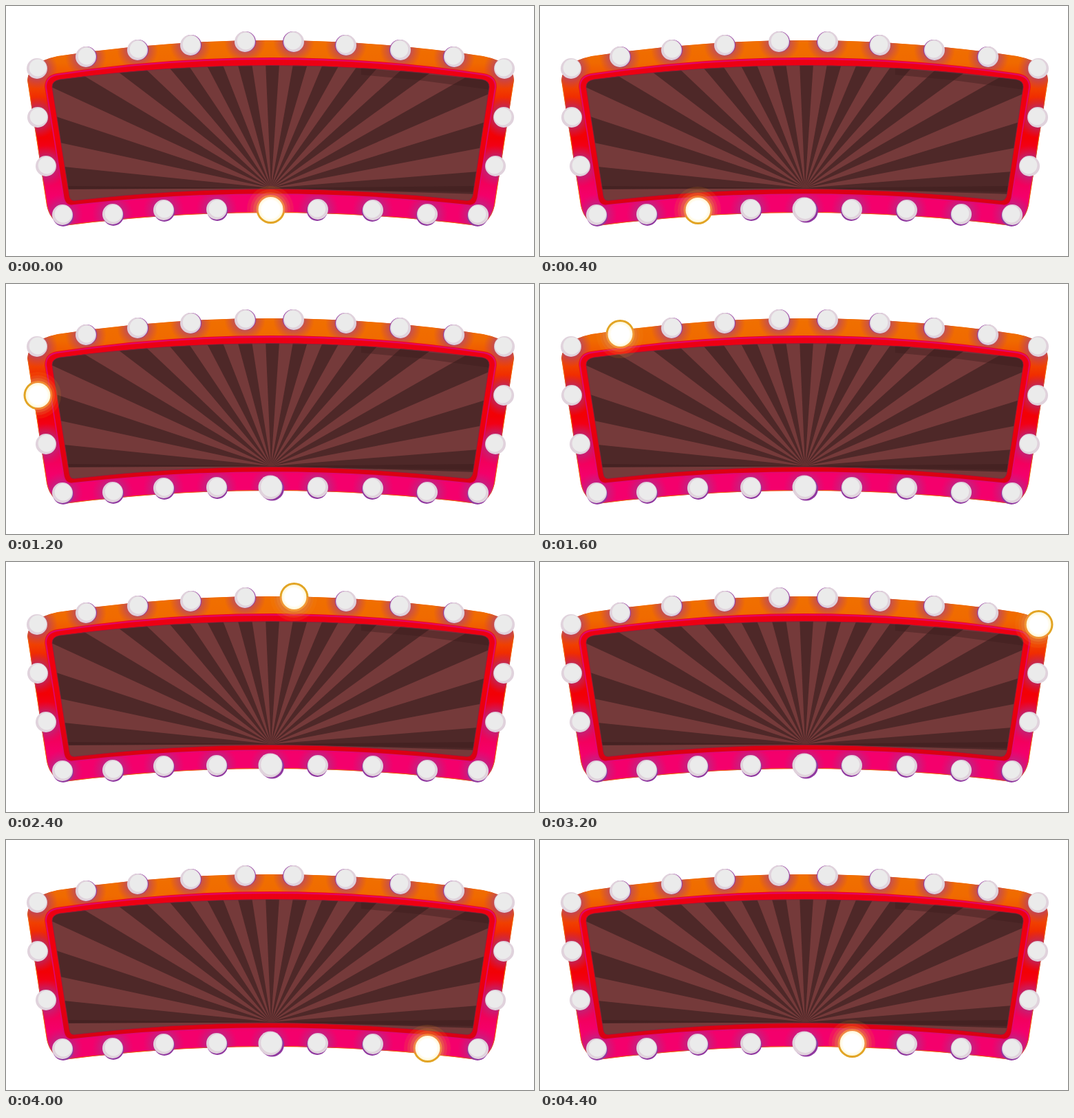
An HTML page that plays this animation: 767 px wide and 364 px high, repeating every 4.6 s.

```html
<!DOCTYPE html>
<html lang="en">
<head>
<meta charset="utf-8">
<title>Marquee sign</title>
<style>
  html, body { margin: 0; width: 100%; height: 100%; overflow: hidden; background: #fff; }
  svg { display: block; }
</style>
</head>
<body>
<svg id="stage" width="767" height="364" viewBox="0 0 767 364">
  <defs>
    <linearGradient id="body" gradientUnits="userSpaceOnUse" x1="0" y1="50" x2="0" y2="320">
      <stop offset="0" stop-color="#f07000"/>
      <stop offset=".12" stop-color="#f06a00"/>
      <stop offset=".25" stop-color="#f04400"/>
      <stop offset=".4" stop-color="#f20800"/>
      <stop offset=".53" stop-color="#f20006"/>
      <stop offset=".72" stop-color="#f20050"/>
      <stop offset=".85" stop-color="#f4006c"/>
      <stop offset="1" stop-color="#f4006c"/>
    </linearGradient>
    <linearGradient id="rim" gradientUnits="userSpaceOnUse" x1="0" y1="76" x2="0" y2="290">
      <stop offset="0" stop-color="#ec0014"/>
      <stop offset=".5" stop-color="#f0000c"/>
      <stop offset="1" stop-color="#d80014"/>
    </linearGradient>
    <linearGradient id="rimEdge" gradientUnits="userSpaceOnUse" x1="0" y1="76" x2="0" y2="290">
      <stop offset="0" stop-color="#f00020"/>
      <stop offset=".6" stop-color="#f00020" stop-opacity="0"/>
    </linearGradient>
    <radialGradient id="halo">
      <stop offset=".5" stop-color="#a03a90" stop-opacity=".55"/>
      <stop offset="1" stop-color="#b02a80" stop-opacity="0"/>
    </radialGradient>
    <radialGradient id="core">
      <stop offset=".72" stop-color="#fff"/>
      <stop offset="1" stop-color="#fff6d4"/>
    </radialGradient>
    <path id="signShape" d="M31 108 Q33 82 75 73 Q384 27 693 73 Q737 82 738 108 L710 290 Q704 316 684 320 Q384 282 84 320 Q64 314 59 290 Z"/>
    <path id="rimShape" d="M58 118 Q58 103 74 100 Q384 54 694 100 Q711 103 711 118 L685 280 Q682 292 672 290 Q384 258 97 290 Q87 292 84 280 Z"/>
    <path id="panelShape" d="M67 118 Q67 109 78 107 Q384 66 692 107 Q702 109 702 118 L678 276 Q676 285 666 283 Q384 250 102 283 Q93 285 92 276 Z"/>
    <clipPath id="signClip"><use href="#signShape"/></clipPath>
    <clipPath id="panelClip"><use href="#panelShape"/></clipPath>
  </defs>

  <g id="rings"></g>
  <use href="#signShape" fill="url(#body)" stroke="#f26a00" stroke-width="2" clip-path="url(#signClip)"/>
  <g id="halos" clip-path="url(#signClip)"></g>
  <use href="#rimShape" fill="url(#rim)" stroke="url(#rimEdge)" stroke-width="4"/>
  <use href="#rimShape" fill="none" stroke="#dc0a78" stroke-width="1.5"/>
  <g clip-path="url(#panelClip)">
    <rect x="60" y="80" width="650" height="210" fill="#753a3a"/>
    <g id="rays" fill="#4e2828"></g>
    <path d="M80 262 L385 265 L690 262 V271 L385 266 L80 266 Z" fill="#3c1c1c" opacity=".5"/>
    <path d="M516 90 L704 108 V122 L600 108 L516 100 Z" fill="#3c1c1c" opacity=".4"/>
  </g>
  <use href="#panelShape" fill="none" stroke="#8c2040" stroke-width=".7"/>
  <g id="bulbs"></g>
  <g id="glows" clip-path="url(#signClip)"></g>
  <g id="cores"></g>
</svg>
<script>
  const STEP = 200;
  const RAYS = { x: 385, y: 265, reach: 420, count: 29, start: -0.4, step: 6.28 };
  // Bulb centres in lighting order: clockwise from the bottom middle.
  const BULBS = [
    [384, 296], [306, 296], [229, 297], [155, 303], [82, 304],
    [58, 233], [46, 162], [45, 91],
    [116, 74], [191, 64], [268, 57], [347, 52], [418, 52], [494, 57], [573, 64], [651, 74],
    [724, 91], [723, 162], [711, 233],
    [686, 304], [612, 303], [533, 297], [453, 296]
  ];
  const layer = id => document.getElementById(id);

  function add(parent, tag, attrs = {}) {
    const el = document.createElementNS('http://www.w3.org/2000/svg', tag);
    for (const name in attrs) el.setAttribute(name, attrs[name]);
    return parent.appendChild(el);
  }

  function disc(parent, cx, cy, r, fill, opacity = 1) {
    return add(parent, 'circle', { cx, cy, r, fill, opacity });
  }

  // Shows one opacity during the bulb's own step and another for the rest of the loop.
  function blink(el, index, during, otherwise) {
    const count = BULBS.length;
    el.animate([
      { opacity: during, offset: 0 },
      { opacity: during, offset: 1 / count },
      { opacity: otherwise, offset: 1 / count },
      { opacity: otherwise, offset: 1 }
    ], {
      duration: STEP * count,
      iterations: Infinity,
      iterationStart: ((count - index) % count) / count
    });
  }

  function drawRays() {
    const { x, y, reach, count, start, step } = RAYS;
    const point = k => {
      const angle = (start + k * step) * Math.PI / 180;
      return `${x - reach * Math.cos(angle)},${y - reach * Math.sin(angle)}`;
    };
    for (let k = 0; k < count; k += 2) {
      add(layer('rays'), 'polygon', { points: `${x},${y} ${point(k)} ${point(k + 1)}` });
    }
  }

  function drawBulb([x, y], index) {
    const middle = index === 0;
    const r = middle ? 17.5 : 15;
    const inward = middle ? 1 : Math.sign(384 - x);
    const atBottom = y > 280;
    const atTop = y < 80;
    const litX = x + .5;
    const litY = atTop ? y - 1 : y;

    disc(layer('halos'), x, y, 30, 'url(#halo)');

    const bulb = add(layer('bulbs'), 'g');
    if (atBottom || atTop) {
      disc(bulb, x + inward * (middle ? 2.5 : 1), y + (atBottom ? 2 : 0), r, '#9038a0');
    }
    disc(bulb, x, y, r, '#e0d2dc');
    disc(bulb, x + inward * 1.2, y - 1, r - 2.5, '#ebebeb');
    blink(bulb, index, 0, 1);

    const ring = disc(layer('rings'), litX, litY, 21, '#e2a424');
    blink(ring, index, 1, 0);

    const glow = add(layer('glows'), 'g');
    disc(glow, x, y, 34, '#f09020', .14);
    disc(glow, x, y, 29, '#f09828', .18);
    disc(glow, x, y, 25, '#f4a030', .25);
    disc(glow, litX, litY, 21, '#ffb838', .5);
    blink(glow, index, 1, 0);

    const core = disc(layer('cores'), litX, litY, 18, 'url(#core)');
    blink(core, index, 1, 0);
  }

  drawRays();
  BULBS.forEach(drawBulb);
</script>
</body>
</html>
```
